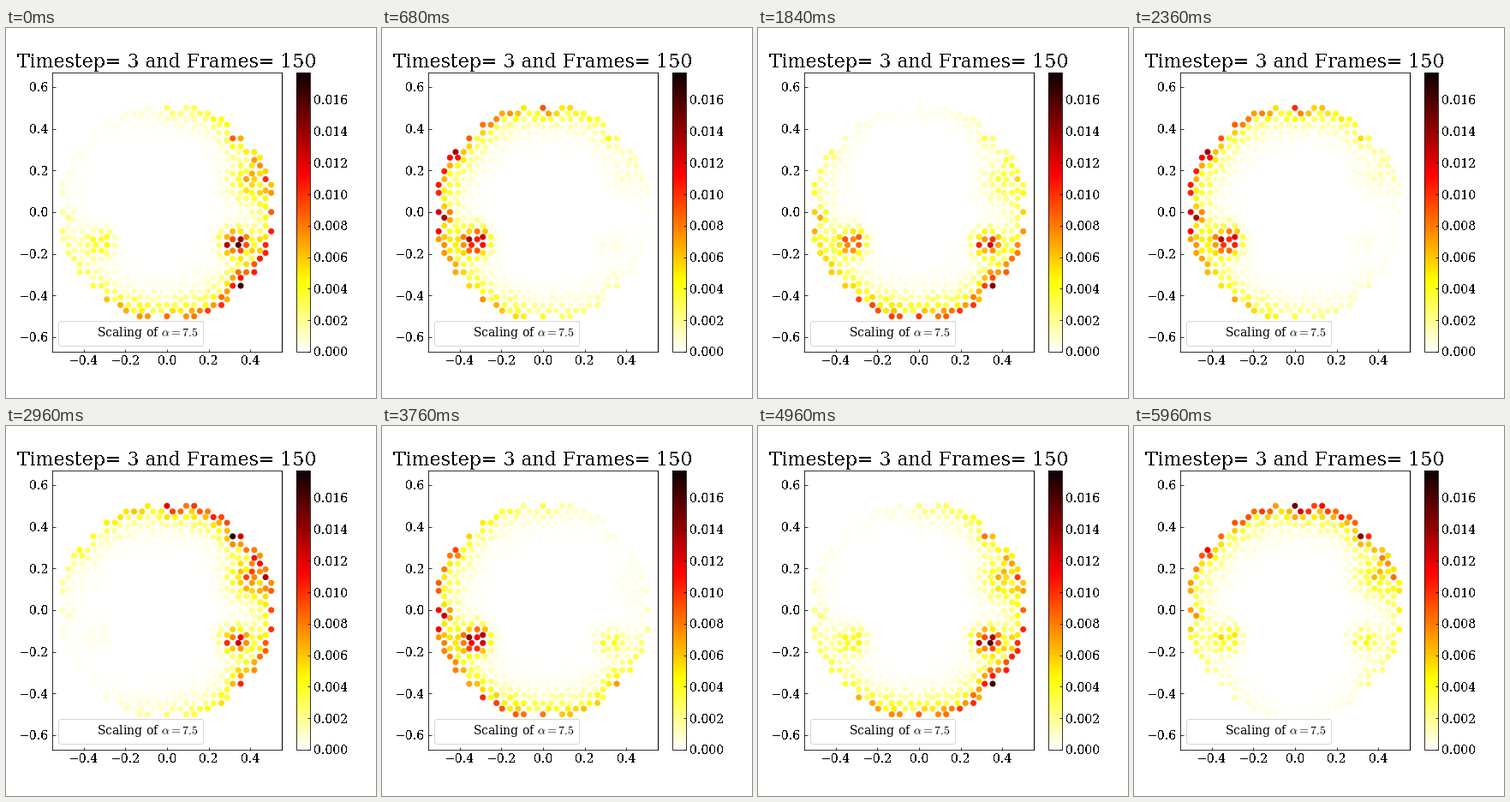
A matplotlib script that plays this animation: 432 by 432 pixels, repeating every 6000 ms.

```python
import numpy as np
import matplotlib.pyplot as plt
from matplotlib.animation import FuncAnimation

FRAMES, INTERVAL = 150, 40
PERIOD = 1647            # ms for one lap of the wave packet
VMAX = 0.01774
R2 = np.sqrt(2)
HALF = 6 + 5 * R2        # half width of the patch in tile edges

plt.rcParams.update({
    "font.family": "DejaVu Serif", "font.size": 14, "mathtext.fontset": "cm",
    "text.antialiased": False,
    "xtick.direction": "in", "ytick.direction": "in",
    "xtick.major.pad": 4, "ytick.major.pad": 4,
    "figure.subplot.left": 0.125, "figure.subplot.right": 0.9,
    "figure.subplot.bottom": 0.125, "figure.subplot.top": 0.88,
})


def in_octagon(x, y, apothem):
    return np.maximum(np.maximum(abs(x), abs(y)),
                      (abs(x) + abs(y)) / R2) < apothem


def octagonal_tiling(apothem, shift):
    """Cut-and-project vertices of the Ammann-Beenker tiling."""
    a, b, c, d = np.meshgrid(np.arange(-9, 10), np.arange(-12, 13),
                             np.arange(-9, 10), np.arange(-12, 13),
                             indexing="ij")
    x, y = a + b / R2, c + d / R2
    u, v = a - b / R2 - shift[0], d / R2 - c - shift[1]
    keep = (b + d) % 2 == 0
    keep &= in_octagon(x, y, apothem) & in_octagon(u, v, (1 + R2) / 2)
    return x[keep], y[keep]


# Places where the edge state piles up: x, y, height (1e-3), width
SPOTS = [
    (-8.6, -3.7, 17, 1.2), (8.5, -3.8, 16, 1.1), (9.8, 4.0, 6, 1.6),
    (-12.6, -0.5, 10, 0.7), (-11.0, 7.5, 8, 0.8), (0.4, 12.8, 9, 0.8),
    (8.4, 9.4, 8, 1.0), (9.2, -8.8, 10, 0.9),
]


def site_strength(x, y):
    rng = np.random.default_rng(8)
    depth = HALF - np.hypot(x, y)
    peak = 9 * np.exp(-np.clip(depth, 0, None) / 1.4)
    for sx, sy, height, width in SPOTS:
        dist2 = (x - sx) ** 2 + (y - sy) ** 2
        peak += height * np.exp(-dist2 / (2 * width ** 2))
    return peak * rng.uniform(0.6, 1.3, len(x)) / 1000


x, y = octagonal_tiling(HALF + 0.01, (0.05, -0.1))
strength = site_strength(x, y)
theta = np.arctan2(y, x)


def density(i):
    centre = np.radians(318 - 360 * i * INTERVAL / PERIOD)
    envelope = (1 + np.cos(theta - centre)) / 2
    return strength * (0.03 + 0.97 * envelope)


fig, ax = plt.subplots(figsize=(6, 6), dpi=72, facecolor="white")
dots = ax.scatter(x / (2 * HALF), y / (2 * HALF), c=density(0), s=36,
                  cmap="hot_r", vmin=0, vmax=VMAX)
ax.set_xlim(-0.55, 0.55)
ax.set_ylim(-0.67, 0.67)
ax.set_xticks(np.arange(-2, 3) * 0.2)
ax.set_yticks(np.arange(-3, 4) * 0.2)
ax.spines["right"].set_linewidth(1)
ax.set_title("Timestep= 3 and Frames= 150", fontsize=22)
handle = ax.scatter([], [], c="white")
legend = ax.legend([handle], [r"Scaling of $\alpha=7.5$"], loc="lower left",
                   fontsize=14)
legend.get_texts()[0].set_antialiased(True)
bar = fig.colorbar(dots, ax=ax)
bar.set_ticks(np.arange(9) * 0.002)


def update(i):
    dots.set_array(density(i))
    return (dots,)


anim = FuncAnimation(fig, update, frames=FRAMES, interval=INTERVAL,
                     repeat=True, repeat_delay=0, blit=False)
plt.show()
```
